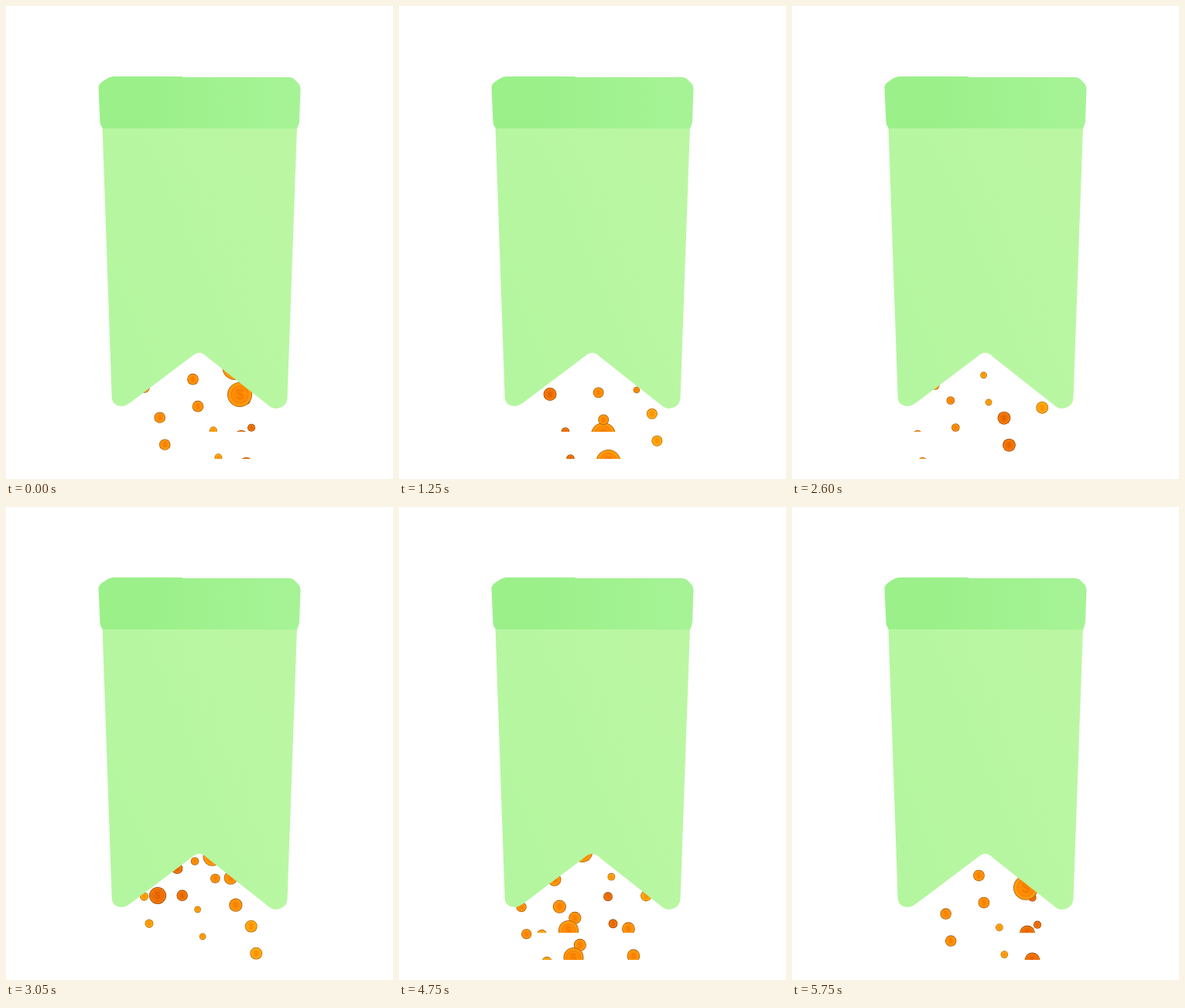
An HTML page with a canvas for the animation above (5.8 s loop, 500 px wide and 611 px high).

```html
<!DOCTYPE html>
<html lang="en">
<head>
<meta charset="utf-8">
<title>Falling coins</title>
<style>
  html, body { margin: 0; width: 100%; height: 100%; overflow: hidden; background: #fff; }
  canvas { display: block; width: 500px; height: 611px; }
</style>
</head>
<body>
<canvas id="stage" width="500" height="611"></canvas>
<script>
const ctx = document.getElementById('stage').getContext('2d');
const LOOP = 5800, STEP = 50, TAU = Math.PI * 2;
const SMALL_COUNT = 38;
const ECHO = { x: 6.5, y: 35 };
const TONES = [
  { face: '#ffae10', core: '#ffa00c', mark: '#f88a00', rim: '#b86a08' },
  { face: '#ff9a0c', core: '#ff8c06', mark: '#f27a00', rim: '#b05806' },
  { face: '#f57c08', core: '#f07004', mark: '#dc5e00', rim: '#a04806' }
];

let seed = 7;
function random() {
  seed = (seed * 16807) % 2147483647;
  return seed / 2147483647;
}

// Larger coins fall faster
const speed = r => 55 + 9.3 * r;

// The large coins: time, x, y at that time, radius
const coins = [
  [0, 295.5, 467, 16], [0, 304, 558, 10],
  [1250, 264, 554, 16],
  [2100, 221, 475, 13.5], [2100, 148, 526, 16],
  [3050, 189.5, 467, 11],
  [3850, 289, 492, 13.5], [3850, 260, 550, 12], [3850, 193, 535, 9.5],
  [4750, 219, 547, 13], [4750, 230.5, 411, 13]
].map(([time, x, y, r]) => ({ time, x, y, r, tone: TONES[r > 9.5 && r < 12 ? 2 : 1] }));

// Small coins spread evenly across x, thinning out early in the loop
for (let i = 0; i < SMALL_COUNT; i++) {
  const u = i / SMALL_COUNT;
  coins.push({
    time: LOOP * (u + 0.5 * Math.sin(TAU * (u - 0.22)) / TAU),
    x: 156 + 181 * (i * 0.618 % 1),
    y: 520,
    r: 4 + 5 * random() ** 1.4,
    tone: TONES[Math.floor(random() * 3)]
  });
}
coins.sort((a, b) => a.r - b.r);

function disc(x, y, r, color) {
  ctx.fillStyle = color;
  ctx.beginPath();
  ctx.arc(x, y, r, 0, TAU);
  ctx.fill();
}

function drawCoin({ x, r, tone }, y) {
  disc(x, y, r, tone.rim);
  disc(x, y, r - 0.8, tone.face);
  if (r > 9) disc(x, y, r * 0.72, tone.mark);
  disc(x, y, r * 0.67, tone.core);
  ctx.fillStyle = tone.mark;
  ctx.font = `bold ${r * 1.15}px "Liberation Sans", Arial, sans-serif`;
  ctx.fillText('$', x, y + r * 0.06);
}

function drawCoins(t, dx, dy) {
  ctx.save();
  ctx.translate(dx, dy);
  ctx.beginPath();
  ctx.rect(144, 250, 240, 300);
  ctx.clip();
  for (const c of coins) {
    const dt = (t - c.time + LOOP * 1.5) % LOOP - LOOP / 2;
    const y = c.y + speed(c.r) * dt / 1000;
    if (y > 230 && y < 570) drawCoin(c, y);
  }
  ctx.restore();
}

function fade(x0, y0, x1, y1, from, to) {
  const g = ctx.createLinearGradient(x0, y0, x1, y1);
  g.addColorStop(0, from);
  g.addColorStop(1, to);
  return g;
}

const body = new Path2D(`M124.5 156 L136.7 506 Q138 517 151 517 Q156 516 161 512
  L240 452.5 Q250 443 260 453.5 L338 515 Q343 520 349 520 Q363 518 363.5 506 L376 156 Z`);
const head = new Path2D(`M119.5 105 Q120 101 124 98 L130 94 Q133 92 138 91
  L228 91 L228 92 L366 92 Q369 92 372 94 L378 100 Q380.5 103 380.5 107
  L379 149 Q378 154 376 158.5 L250 158 L125 158 Q121.5 154 121.5 150 Z`);
const bodyFill = fade(130, 400, 370, 300, '#b4f69f', '#bbf7a3');
const headFill = fade(180, 120, 380, 110, '#9bf08a', '#a6f396');

ctx.textAlign = 'center';
ctx.textBaseline = 'middle';

function frame(now) {
  const t = Math.floor(now / STEP) * STEP % LOOP;
  ctx.fillStyle = '#fff';
  ctx.fillRect(0, 0, 500, 611);
  drawCoins(t, 0, 0);
  drawCoins(t, ECHO.x, ECHO.y);
  ctx.fillStyle = bodyFill;
  ctx.fill(body);
  ctx.fillStyle = headFill;
  ctx.fill(head);
}

let start;
function tick(now) {
  start ??= now;
  frame(Math.max(0, now - start));
  requestAnimationFrame(tick);
}
frame(0);
requestAnimationFrame(tick);
</script>
</body>
</html>
```
